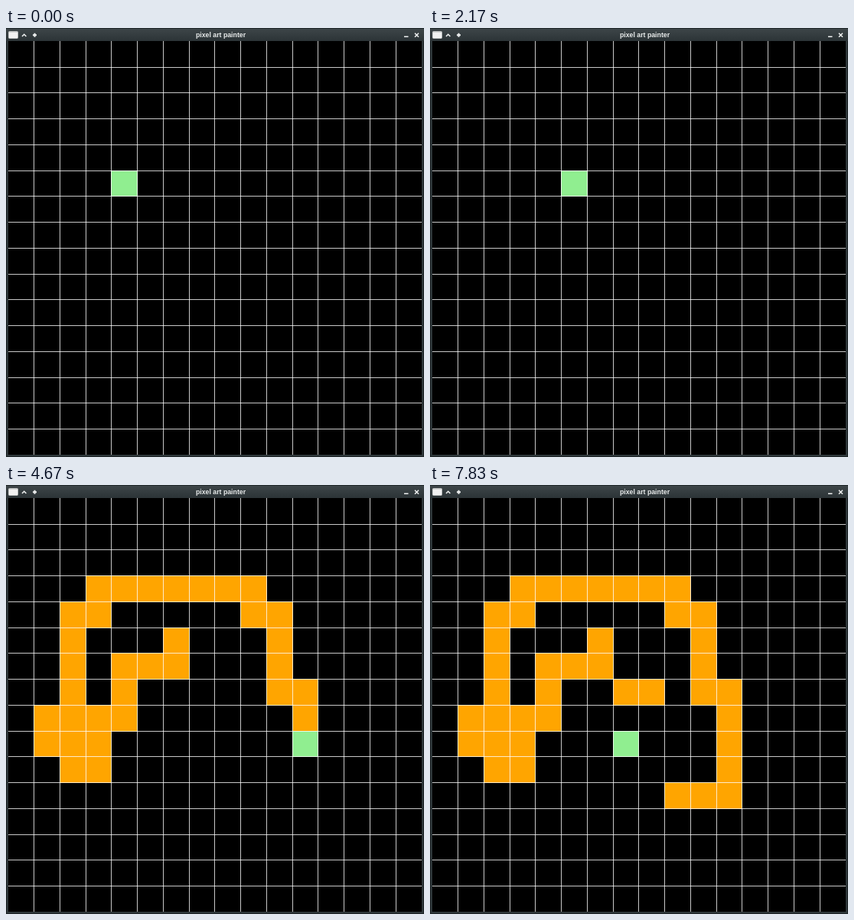
Animation of 546 by 560 pixels, one loop 8 s. Source, as an HTML page with a canvas:

```html
<!DOCTYPE html>
<html lang="en">
<head>
<meta charset="utf-8">
<title>pixel art painter</title>
<style>
  html, body { margin: 0; width: 546px; height: 560px; overflow: hidden; background: #2f383b; }
  #win { position: relative; width: 546px; height: 560px; background: #2f383b; box-shadow: inset 0 0 0 1px #1d2426; }
  #bar { position: absolute; left: 0; top: 0; width: 546px; height: 17px;
         background: linear-gradient(#20282a 0 1px, #3d4548 1px, #2c3437); }
  #bar svg { position: absolute; left: 0; top: 0; }
  #bar text { font: bold 8.75px "Liberation Sans", Arial, sans-serif; fill: #e8ebeb; text-anchor: middle; }
  canvas { position: absolute; left: 0; top: 0; }
</style>
</head>
<body>
<div id="win">
  <canvas id="board" width="546" height="560"></canvas>
  <div id="bar">
    <svg width="546" height="17" fill="none" stroke="#f0f2f2" stroke-width="1.5">
      <rect x="3.5" y="4.5" width="12" height="9" rx="1" fill="#f1f1f1" stroke="#bfc2c2" stroke-width="1"/>
      <path d="M4 5.5H15" stroke="#d0d2d2" stroke-width="1"/>
      <path d="M21 11 23.7 8.3 26.4 11"/>
      <path d="M35 9.3H40M37.5 6.8V11.8" stroke-width="2"/>
      <path d="M520 11.3H525.5"/>
      <path d="M534 6.8 539 11.8M539 6.8 534 11.8"/>
      <text x="280.5" y="12" stroke="none">pixel art painter</text>
    </svg>
  </div>
</div>
<script>
const LOOP = 8000, N = 16, PITCH = 33.75;
const px = c => Math.floor(2.9 + c * PITCH);
const py = r => Math.floor(17.4 + r * PITCH);

// One entry per tick of 1/6 s; upper case paints, lower case only moves.
const ticks = (
  ",dd,rdd,rdd,rru,uu,u,lu,rrd,rdd,,lu,lluu,llu,r,,,," +
  "DLLD,DLD,DLU,LUR,UUU,UR,U,RRRR,RRD,RDDD,RDD,D,DL,L,," +
  "u,lu,l,r,lu,lu,r,R,d,dl,l,l,d,r,ur"
).split(",");
const step = { l: [-1, 0], r: [1, 0], u: [0, -1], d: [0, 1] };

let x = 4, y = 5;
const painted = new Set();
const states = ticks.map((moves, k) => {
  for (const m of moves) {
    const key = m.toLowerCase(), pen = m !== key;
    if (pen) painted.add(y * N + x);
    x += step[key][0];
    y += step[key][1];
    if (pen) painted.add(y * N + x);
  }
  return { start: Math.round(k * 50 / 3) * 10, x, y, cells: [...painted] };
});

const ctx = document.getElementById("board").getContext("2d");

function cell(c, r, color) {
  ctx.fillStyle = color;
  ctx.fillRect(px(c), py(r), px(c + 1) - px(c) + 1, py(r + 1) - py(r) + 1);
}

function draw(s) {
  ctx.fillStyle = "#000";
  ctx.fillRect(3, 17, 540, 540);
  for (const i of s.cells) cell(i % N, Math.floor(i / N), "#ffa500");
  cell(s.x, s.y, "#90ee90");
  ctx.fillStyle = "rgba(255,255,255,.78)";
  for (let i = 1; i < N; i++) {
    ctx.fillRect(px(i), 17, 1, 540);
    ctx.fillRect(3, py(i), 540, 1);
  }
}

function frame() {
  const t = performance.now() % LOOP;
  let k = states.length - 1;
  while (states[k].start > t) k--;
  draw(states[k]);
  requestAnimationFrame(frame);
}
frame();
</script>
</body>
</html>
```
